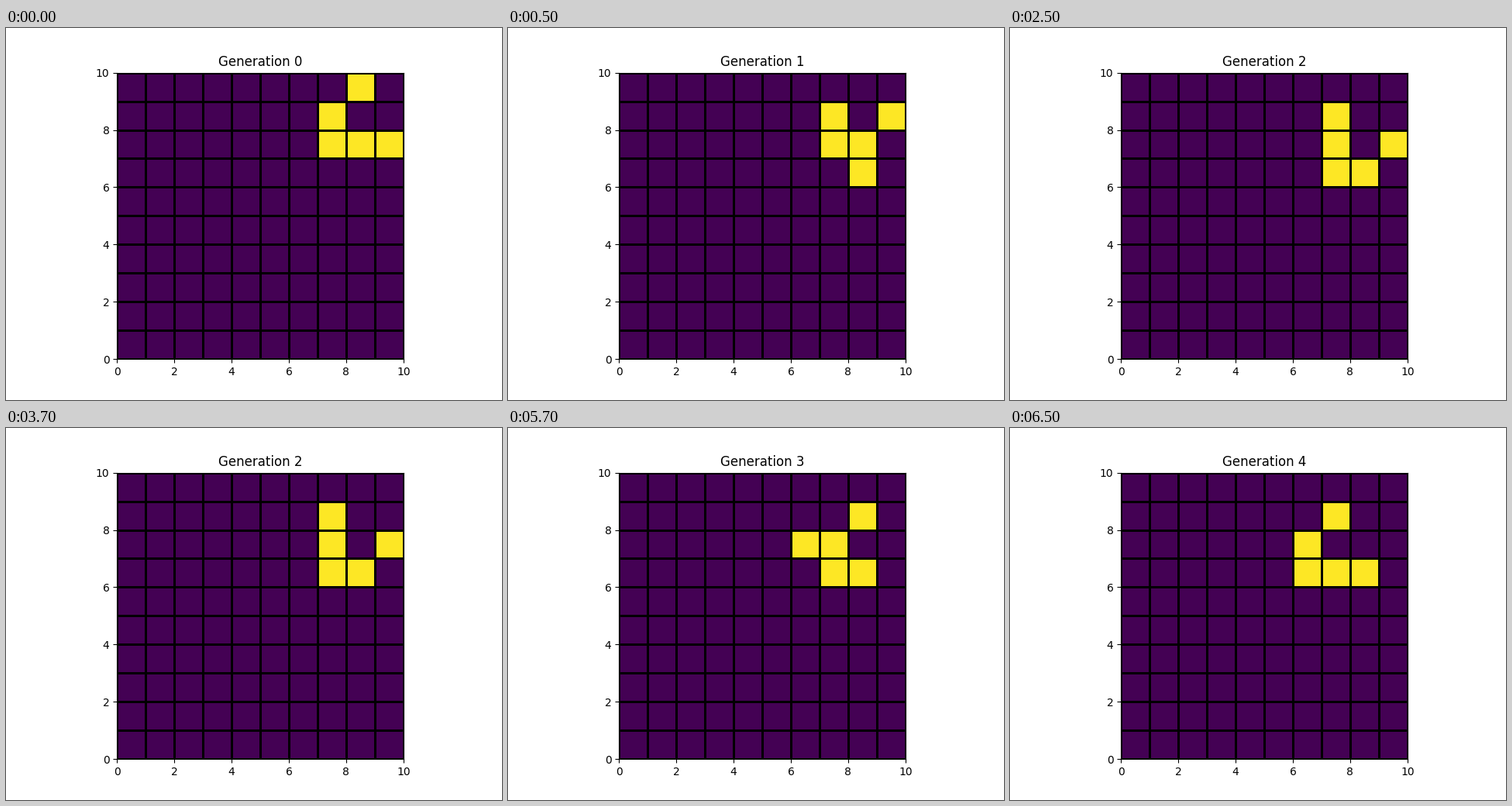
These frames come from a looping animation (640x480 px, 8000 ms). A matplotlib script:

```python
import numpy as np
import matplotlib.pyplot as plt
from matplotlib.animation import FuncAnimation

SIZE = 10
INTERVAL = 500
FRAMES = 16
FRAMES_PER_STEP = 4
GLIDER = [(9, 8), (8, 7), (7, 7), (7, 8), (7, 9)]  # (row, column)


def step(cells):
    """One Game of Life step on a wrapping board."""
    shifts = [(dy, dx) for dy in (-1, 0, 1) for dx in (-1, 0, 1) if dy or dx]
    neighbours = sum(np.roll(cells, shift, axis=(0, 1)) for shift in shifts)
    alive = (neighbours == 3) | ((cells == 1) & (neighbours == 2))
    return alive.astype(int)


def board(generation):
    cells = np.zeros((SIZE, SIZE), dtype=int)
    for row, column in GLIDER:
        cells[row, column] = 1
    for _ in range(generation):
        cells = step(cells)
    return cells


fig, ax = plt.subplots(figsize=(6.4, 4.8), dpi=100)
mesh = ax.pcolormesh(board(0), cmap="viridis", vmin=0, vmax=1,
                     edgecolors="k", linewidth=2)
ax.set_aspect("equal")
title = ax.set_title("Generation 0")


def update(frame):
    # The opening board is shown for a single frame only.
    generation = (frame + FRAMES_PER_STEP - 1) // FRAMES_PER_STEP
    mesh.set_array(board(generation))
    title.set_text(f"Generation {generation}")
    return mesh, title


anim = FuncAnimation(fig, update, frames=FRAMES, interval=INTERVAL,
                     repeat=True, repeat_delay=0)
plt.show()
```
